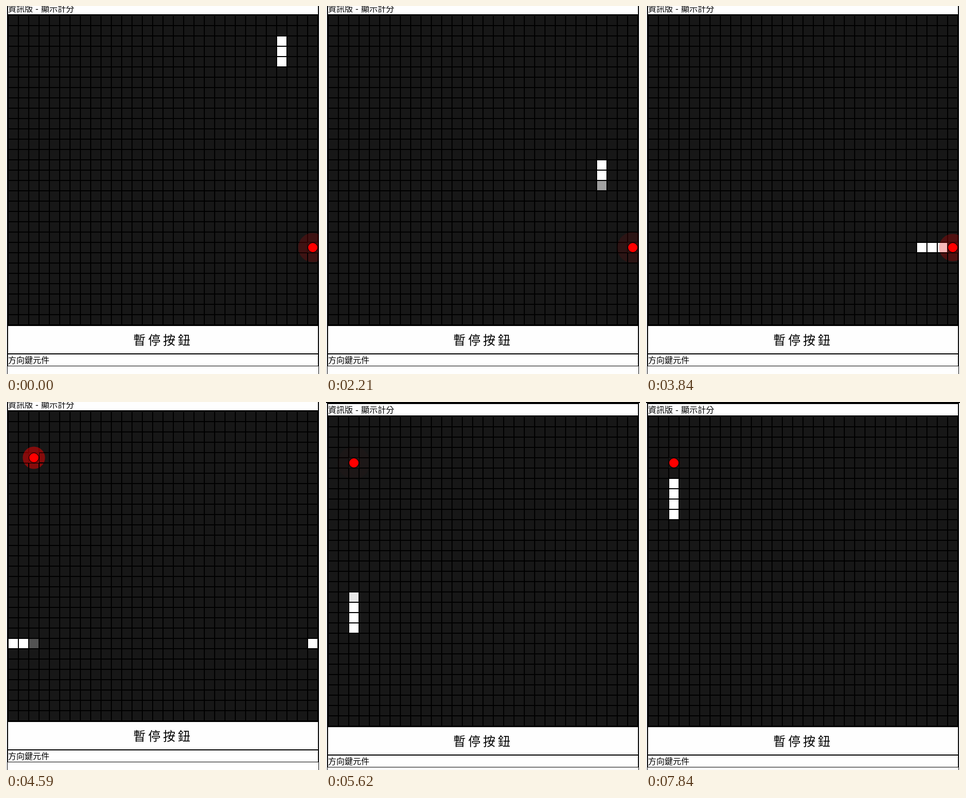
Write an HTML page with a canvas that moves like this. It is 608 by 713 pixels and loops after 7990 ms.

```html
<!DOCTYPE html>
<html lang="zh-Hant">
<head>
<meta charset="utf-8">
<style>
  html, body { margin: 0; width: 100%; height: 100%; overflow: hidden; background: #fefefe; }
  canvas { display: block; }
</style>
</head>
<body>
<canvas id="stage" width="608" height="713"></canvas>
<script>
const ctx = document.getElementById('stage').getContext('2d');
const LOOP = 7990, TICK = LOOP / 54;      // the picture refreshes in 54 even ticks
const CELL = 20, COUNT = 30, LEFT = 4, TOP = 28;
const STEP = 198.6, LEAD = 198;           // snake step length and head start, ms
const FADE = 100, PULSE = 2000, PULSE_LEAD = 1061;
const EAT_STEP = 21, EAT_TIME = EAT_STEP * STEP - LEAD;
const SCROLL_TIME = 4700;
const PAPER = '#fefefe', INK = '#000', FLOOR = '#171717';
const FONT = '"DejaVu Sans", "Noto Sans CJK TC", "Noto Sans CJK", sans-serif';

// CSS "ease": cubic-bezier(.25, .1, .25, 1)
function ease(x) {
  let lo = 0, hi = 1;
  for (let i = 0; i < 20; i++) {
    const u = (lo + hi) / 2;
    if (.75 * u * (1 - u) + u ** 3 < x) lo = u; else hi = u;
  }
  return .3 * lo * (1 - lo) ** 2 + 3 * lo * lo * (1 - lo) + lo ** 3;
}

// Down, then right through the wall, then up
function headAt(step) {
  if (step <= 18) return [26, 4 + step];
  if (step <= 24) return [(8 + step) % COUNT, 22];
  return [2, 46 - step];
}

function rect(color, x, y, w, h) {
  ctx.fillStyle = color;
  ctx.fillRect(x, y, w, h);
}

function disc(color, x, y, r) {
  ctx.fillStyle = color;
  ctx.beginPath();
  ctx.arc(x, y, r, 0, 2 * Math.PI);
  ctx.fill();
}

function text(string, x, y, size, spacing = 0) {
  ctx.font = `${size}px ${FONT}`;
  ctx.letterSpacing = spacing + 'px';
  ctx.fillStyle = INK;
  ctx.fillText(string, x, y);
}

function drawPage() {
  rect(INK, 0, 0, 608, 2);
  rect(INK, 2, 2, 604, 730);
  rect(PAPER, 4, 4, 600, 22);
  rect(PAPER, 4, 630, 600, 53);
  rect(PAPER, 4, 685, 600, 22);
  rect(PAPER, 3, 708, 602, 30);
  text('資訊版 - 顯示計分', 4, 21, 16);
  text('暫停按鈕', 246.4, 666, 24, 4.8);
  text('方向鍵元件', 4, 702, 16);
}

function drawFood(x, y, time) {
  const elapsed = time < EAT_TIME ? time + PULSE_LEAD : time - EAT_TIME;
  const p = ease(elapsed % PULSE / PULSE);
  ctx.save();
  ctx.beginPath();
  ctx.rect(3, TOP - 1, 602, 602);
  ctx.clip();
  disc(`rgba(255,0,0,${1 - p})`, x, y, 10 + 22 * p);
  disc(INK, x, y, 10);
  disc('#f00', x, y, 9);
  ctx.restore();
}

function drawBoard(time) {
  const step = Math.floor((time + LEAD) / STEP);
  const age = time + LEAD - step * STEP;
  const shade = Math.round(23 + 232 * ease(Math.min(1, age / FADE)));
  const eaten = step >= EAT_STEP;
  const [foodCol, foodRow] = eaten ? [2, 4] : [29, 22];
  const snake = new Map();
  for (let i = eaten ? 3 : 2; i >= 0; i--) {
    snake.set(headAt(step - i).join(), i ? '#fff' : `rgb(${shade},${shade},${shade})`);
  }

  rect(FLOOR, LEFT, TOP, 600, 600);
  ctx.strokeStyle = INK;
  ctx.lineWidth = 1;
  // Cells after the food paint their borders over its halo
  for (let row = 0; row < COUNT; row++) {
    for (let col = 0; col < COUNT; col++) {
      const x = LEFT + col * CELL, y = TOP + row * CELL;
      if (col === foodCol && row === foodRow) {
        drawFood(x + 10, y + 10, time);
        continue;
      }
      const color = snake.get(col + ',' + row);
      if (color) rect(color, x, y, CELL, CELL);
      ctx.strokeRect(x + .5, y + .5, CELL - 1, CELL - 1);
    }
  }
}

function draw() {
  const now = performance.now() % LOOP;
  const time = Math.min(53, Math.floor((now + 10) / TICK)) * TICK;
  ctx.setTransform(1, 0, 0, 1, 0, 0);
  rect(PAPER, 0, 0, 608, 713);
  ctx.translate(0, time < SCROLL_TIME ? -10 : 0);
  drawPage();
  drawBoard(time);
  requestAnimationFrame(draw);
}
draw();
</script>
</body>
</html>
```
